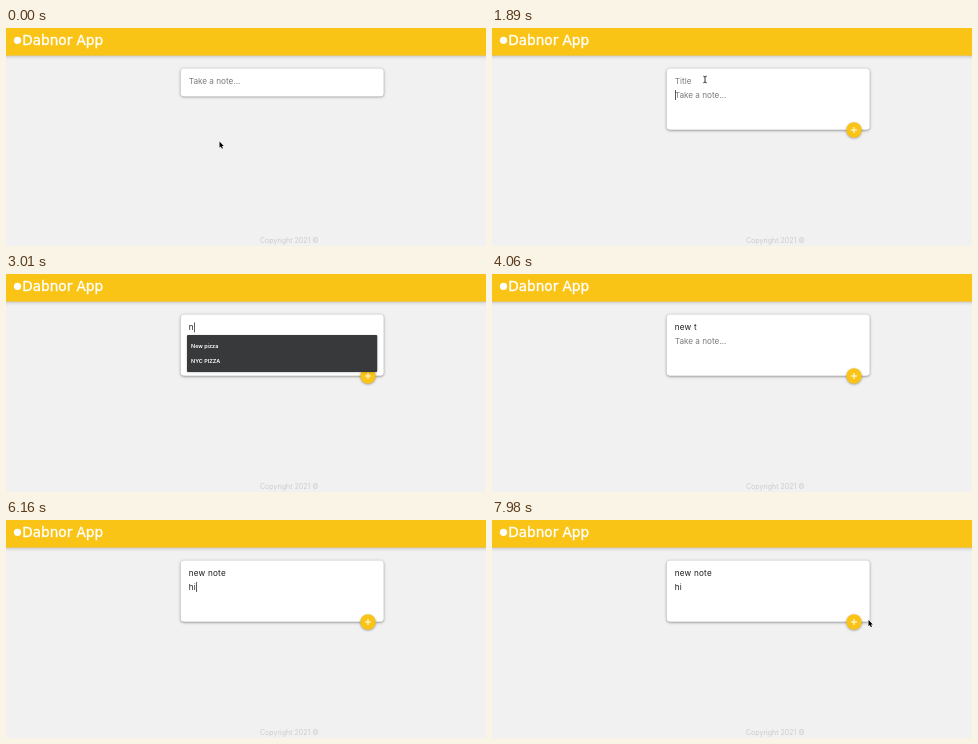
Recreate the animation shown at these times as an HTML page with a canvas. Size 480 px wide and 218 px high, loop 8 s.

```html
<!DOCTYPE html>
<html lang="en">
<head>
<meta charset="utf-8">
<title>Notes</title>
<style>
html, body { margin: 0; width: 100%; height: 100%; overflow: hidden; background: #f1f1f1; }
canvas { display: block; width: 480px; height: 218px; }
</style>
</head>
<body>
<canvas id="stage"></canvas>
<script>
const LOOP = 8000, STEP = 70;
const YELLOW = '#fac417', GREY = '#7b7b7b', INK = '#1c1c1c';
const canvas = document.getElementById('stage');
const ctx = canvas.getContext('2d');
const dpr = window.devicePixelRatio || 1;
canvas.width = 480 * dpr;
canvas.height = 218 * dpr;

// Timelines: [start in ms, value]
const titles = [[0, ''], [2940, 'n'], [3080, 'ne'], [3220, 'new'], [3360, 'new '],
  [3500, 'new t'], [4200, 'new '], [4480, 'new n'], [4620, 'new no'],
  [4690, 'new not'], [4830, 'new note']];
const notes = [[0, ''], [6020, 'h'], [6160, 'hi']];
const queries = [[0, null], [2030, ''], [3010, 'n'], [3080, 'ne'], [3570, null],
  [4200, 'new '], [4480, null]];
const carets = [[0, ''], [840, 'note'], [1330, ''], [1890, 'note'], [2030, 'title'],
  [2520, ''], [2940, 'title'], [4060, ''], [4480, 'title'], [5110, 'note'],
  [5670, ''], [6020, 'note'], [6720, ''], [7280, 'note'], [7840, '']];
const pointers = [[0, 'arrow'], [350, 'beam'], [2940, ''], [7210, 'beam'], [7630, 'arrow']];
const rings = [[0, false], [840, true], [910, false], [2030, true], [2170, false]];
const path = [[0, 213.5, 113.5], [350, 206, 55], [420, 206, 55], [700, 213, 51.5],
  [7140, 213, 51.5], [7700, 361, 99], [7980, 376.5, 100]];
const history = ['TEST1212', 'TEST12', '12121TEST', 'TEST121', 'TEST AVOCADO',
  'New pizza', 'NYC PIZZA'];

const at = (line, t) => line.filter(([start]) => start <= t).pop()[1];

function position(t) {
  const i = Math.max(1, path.findIndex(p => p[0] >= t));
  const [t0, x0, y0] = path[i - 1], [t1, x1, y1] = path[i];
  const u = Math.min(1, (t - t0) / (t1 - t0));
  const k = u * u * (3 - 2 * u);
  return [x0 + (x1 - x0) * k, y0 + (y1 - y0) * k];
}

function shadow(color, blur, dy) {
  ctx.shadowColor = color;
  ctx.shadowBlur = blur * dpr;
  ctx.shadowOffsetY = dy * dpr;
}

function text(str, x, y, font, color, spacing = 0) {
  ctx.font = font;
  ctx.letterSpacing = spacing + 'px';
  ctx.fillStyle = color;
  ctx.fillText(str, x, y);
}

function box(x, y, w, h, r, color) {
  ctx.beginPath();
  ctx.roundRect(x, y, w, h, r);
  ctx.fillStyle = color;
  ctx.fill();
}

function disc(x, y, r, color) {
  ctx.beginPath();
  ctx.arc(x, y, r, 0, Math.PI * 2);
  ctx.fillStyle = color;
  ctx.fill();
}

function header() {
  ctx.save();
  shadow('rgba(0,0,0,.28)', 4, 0.5);
  ctx.fillStyle = YELLOW;
  ctx.fillRect(-8, -8, 496, 35.6);
  ctx.restore();
  disc(11.5, 12.3, 3.6, '#fff');
  text('Dabnor App', 16.3, 17, '13.6px "DejaVu Sans", sans-serif', '#fff');
  ctx.strokeStyle = '#fff';
  ctx.lineWidth = 0.35;
  ctx.strokeText('Dabnor App', 16.3, 17);
}

function field(value, hint, y, focused) {
  const font = '8.2px Inter, sans-serif';
  if (value) text(value, 182.7, y, font, INK, 0.2);
  else text(hint, 182.7, y, font, GREY);
  if (!focused) return;
  const x = 183 + (value ? ctx.measureText(value).width : 0);
  ctx.fillStyle = '#333';
  ctx.fillRect(x, y - 8, 0.8, 10);
}

function addButton(scale) {
  if (scale <= 0) return;
  ctx.save();
  ctx.translate(362, 102);
  ctx.scale(scale, scale);
  ctx.save();
  shadow('rgba(0,0,0,.35)', 2.5, 0.8);
  disc(0, 0, 7.7, YELLOW);
  ctx.restore();
  ctx.fillStyle = '#fff';
  ctx.fillRect(-3, -0.5, 6, 1);
  ctx.fillRect(-0.5, -3, 1, 6);
  ctx.restore();
}

function card(t) {
  const open = t >= 980;
  const focus = at(carets, t);
  ctx.save();
  shadow('rgba(110,110,110,.85)', 2.5, 0.6);
  box(174.7, 40.4, 203, open ? 61.4 : 28, 3.5, '#fff');
  ctx.restore();
  if (open) field(at(titles, t), 'Title', 56.4, focus === 'title');
  field(at(notes, t), 'Take a note...', open ? 70 : 56.4, focus === 'note');
  const u = Math.min(1, Math.max(0, (t - 960) / 160));
  addButton(1 - (1 - u) ** 2);
}

function menu(query) {
  if (query === null) return;
  const items = history.filter(s => s.toLowerCase().startsWith(query)).slice(0, 6);
  ctx.save();
  shadow('rgba(0,0,0,.3)', 2, 0.4);
  box(181, 61, 190.2, 6.6 + items.length * 15.15, 1, '#38393b');
  ctx.restore();
  items.forEach((s, i) =>
    text(s, 185, 73.8 + i * 15.15, '600 5.45px Inter, sans-serif', '#fff'));
}

function arrow(x, y) {
  const shape = [[0, 0], [0, 6.2], [1.4, 5], [2.4, 7.2], [3.4, 6.7], [2.5, 4.6], [4.3, 4.5]];
  ctx.beginPath();
  shape.forEach(([dx, dy]) => ctx.lineTo(x + dx, y + dy));
  ctx.closePath();
  ctx.lineJoin = 'round';
  ctx.strokeStyle = '#fff';
  ctx.lineWidth = 1;
  ctx.stroke();
  ctx.fillStyle = '#000';
  ctx.fill();
}

function beam(x, y) {
  ctx.beginPath();
  for (const s of [-1, 1]) {
    ctx.moveTo(x - 1.7, y + 3.3 * s);
    ctx.quadraticCurveTo(x, y + 3.3 * s, x, y + 2.3 * s);
    ctx.quadraticCurveTo(x, y + 3.3 * s, x + 1.7, y + 3.3 * s);
  }
  ctx.moveTo(x, y - 2.6);
  ctx.lineTo(x, y + 2.6);
  ctx.strokeStyle = '#222';
  ctx.lineWidth = 0.9;
  ctx.stroke();
}

function pointer(t) {
  const kind = at(pointers, t);
  const [x, y] = position(t);
  if (at(rings, t)) {
    disc(x, y, 6.4, '#fff');
    ctx.strokeStyle = '#111';
    ctx.lineWidth = 1.4;
    ctx.stroke();
  }
  if (kind === 'arrow') arrow(x, y);
  if (kind === 'beam') beam(x, y);
}

function draw(now) {
  const t = Math.floor((now % LOOP) / STEP) * STEP;
  ctx.setTransform(dpr, 0, 0, dpr, 0, 0);
  ctx.fillStyle = '#f1f1f1';
  ctx.fillRect(0, 0, 480, 218);
  header();
  text('Copyright 2021 ©', 254, 215, '7px Inter, sans-serif', '#cbcbcb');
  card(t);
  menu(at(queries, t));
  pointer(t);
}

const begin = performance.now();
function tick() {
  draw(performance.now() - begin);
  requestAnimationFrame(tick);
}
tick();
</script>
</body>
</html>
```
